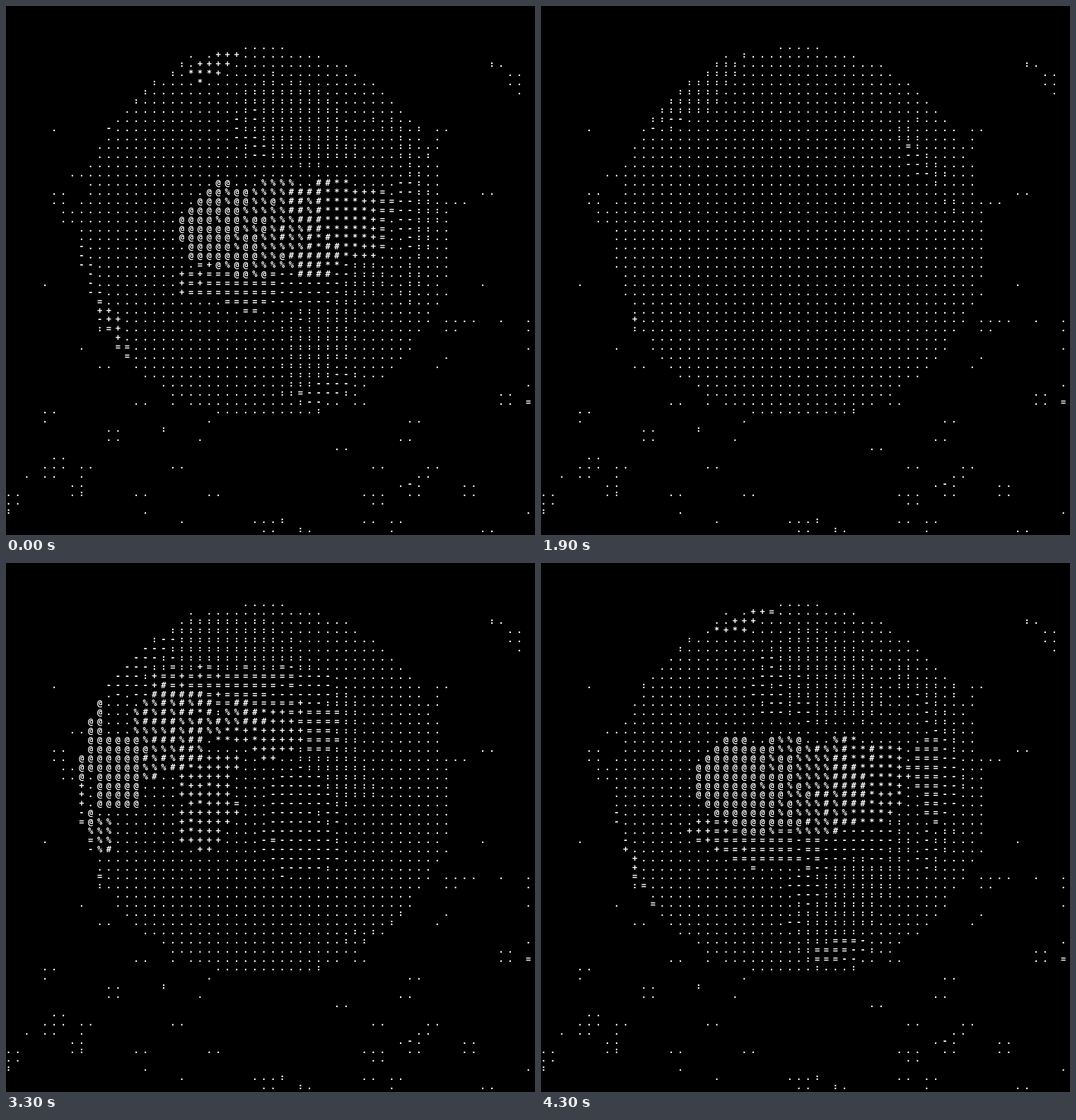
An HTML page with a canvas for the animation above (4.4 s loop, 748x748 px).

```html
<!DOCTYPE html>
<html lang="en">
<head>
<meta charset="utf-8">
<title>ASCII globe</title>
<style>
  html, body { margin: 0; width: 100%; height: 100%; overflow: hidden; background: #000; }
  canvas { display: block; }
</style>
</head>
<body>
<canvas id="stage" width="748" height="748"></canvas>
<script>
const LOOP = 4400, STEP = 100;
const CELLS = 58, PITCH = 748 / CELLS, BASELINE = 9;
const RAMP = ' .:-=+*#%@';
const RAD = Math.PI / 180;
const GLOBE = { col: 28, row: 24.35, radius: 20.45, distance: 3, tilt: 23.4 * RAD };
const SPIN = { start: 2.5, perSecond: -82.3 };
const LIGHT = { x: -0.7, z: 0.71, ambient: 0.25, strength: 0.92 };
const OCEAN = 0.1;

const ctx = document.getElementById('stage').getContext('2d');
ctx.font = 'bold 12px "DejaVu Sans Mono", monospace';

// The continents are rounded patches; later ones lie on top.
const patches = [];
function patch(lon, lat, halfWidth, halfHeight, shade) {
  patches.unshift({ lon, lat, halfWidth, halfHeight, shade });
}

// Asia and Europe
patch(85, 57, 85, 17, 0.29);
patch(17, 50, 25, 12, 0.34);
patch(110, 32, 13, 14, 0.36);
patch(100, 15, 9, 12, 0.43);
patch(82, 47, 36, 5, 0.5);
patch(62, 35, 13, 11, 0.74);
patch(95, 37, 18, 6, 0.64);
patch(83, 39, 8, 3, 0.83);
patch(77, 20, 7, 11, 0.55);
patch(48, 22, 10, 10, 0.95);

// Africa: forest, Sahel, Sahara, Horn, Kalahari
patch(23, -8, 16, 25, 0.37);
patch(8, 11, 26, 5, 0.47);
patch(9, 24, 27, 10.5, 0.97);
patch(44, 5, 7, 5, 0.75);
patch(21, -24, 9, 8, 0.7);

// Australia
patch(134, -25, 20, 11, 0.52);
patch(131, -25, 11, 4, 0.85);

// Greenland and North America
patch(-40, 73, 17, 11, 0.72);
patch(-97, 57, 34, 12, 0.26);
patch(-85, 38, 13, 9, 0.29);
patch(-109, 39, 11, 9, 0.5);
patch(-116, 36, 4, 4, 0.8);
patch(-104, 26, 6, 6, 0.62);

// South America
patch(-60, -6, 17, 14, 0.3);
patch(-46, -13, 9, 11, 0.47);
patch(-68, -22, 5, 10, 0.68);

function albedo(lon, lat) {
  // Wavy offsets roughen the coasts.
  const x = lon + 1.5 * Math.sin(lat * 0.55 + 1);
  const y = lat + 1.2 * Math.sin(lon * 0.4 + 2);
  const found = patches.find(p => {
    const dx = ((x - p.lon + 540) % 360 + 360) % 360 - 180;
    return Math.abs(dx / p.halfWidth) ** 3 + Math.abs((y - p.lat) / p.halfHeight) ** 3 < 1;
  });
  if (!found) return OCEAN;
  return found.shade * (1 + 0.09 * Math.sin(lon * 1.3 + lat) * Math.sin(lat * 1.7 - lon * 0.6));
}

// Casts a perspective ray through a cell and returns its glyph, or '' off the globe.
function globeGlyph(col, row, centreLon) {
  const { distance, radius, tilt } = GLOBE;
  const k = distance * distance - 1;
  const u = (col - GLOBE.col) / radius / Math.sqrt(k);
  const v = (GLOBE.row - row) / radius / Math.sqrt(k);
  const q = u * u + v * v;
  const inside = 1 - k * q;
  if (inside < 0) return '';
  const depth = (distance - Math.sqrt(inside)) / (1 + q);
  const x = u * depth, y = v * depth, z = distance - depth;
  const lat = Math.asin(y * Math.cos(tilt) + z * Math.sin(tilt)) / RAD;
  const lon = Math.atan2(x, z * Math.cos(tilt) - y * Math.sin(tilt)) / RAD + centreLon;
  const light = LIGHT.ambient + LIGHT.strength * Math.max(0, x * LIGHT.x + z * LIGHT.z);
  const level = Math.floor(albedo(lon, lat) * light * 10);
  return RAMP[Math.min(9, Math.max(1, level))];
}

function seededRandom(seed) {
  return () => {
    seed = (seed * 16807) % 2147483647;
    return seed / 2147483647;
  };
}

// Stars come in small clumps that thicken towards the lower right.
function makeSky() {
  const random = seededRandom(4711);
  const sky = new Map();
  for (let clump = 0; clump < 130; clump++) {
    const col = Math.floor(CELLS * random() ** 0.8);
    const row = Math.floor(CELLS * random() ** 0.65);
    const count = 1 + Math.floor(4 * random() ** 1.5);
    for (let i = 0; i < count; i++) {
      const x = col + (i % 2), y = row + (i >> 1);
      const glyph = random() < 0.93 ? '.' : ':::-='[Math.floor(random() * 5)];
      if (x < CELLS && y < CELLS) sky.set(y * CELLS + x, glyph);
    }
  }
  return sky;
}
const sky = makeSky();

function draw(now) {
  const time = Math.floor((now % LOOP) / STEP) * STEP;
  const centreLon = SPIN.start + SPIN.perSecond * time / 1000;
  ctx.fillStyle = '#000';
  ctx.fillRect(0, 0, 748, 748);
  ctx.fillStyle = '#fff';
  for (let row = 0; row < CELLS; row++) {
    for (let col = 0; col < CELLS; col++) {
      const glyph = globeGlyph(col, row, centreLon) || sky.get(row * CELLS + col);
      if (glyph) ctx.fillText(glyph, col * PITCH, row * PITCH + BASELINE);
    }
  }
}

const start = performance.now();
function tick() {
  draw(performance.now() - start);
  requestAnimationFrame(tick);
}
tick();
</script>
</body>
</html>
```
